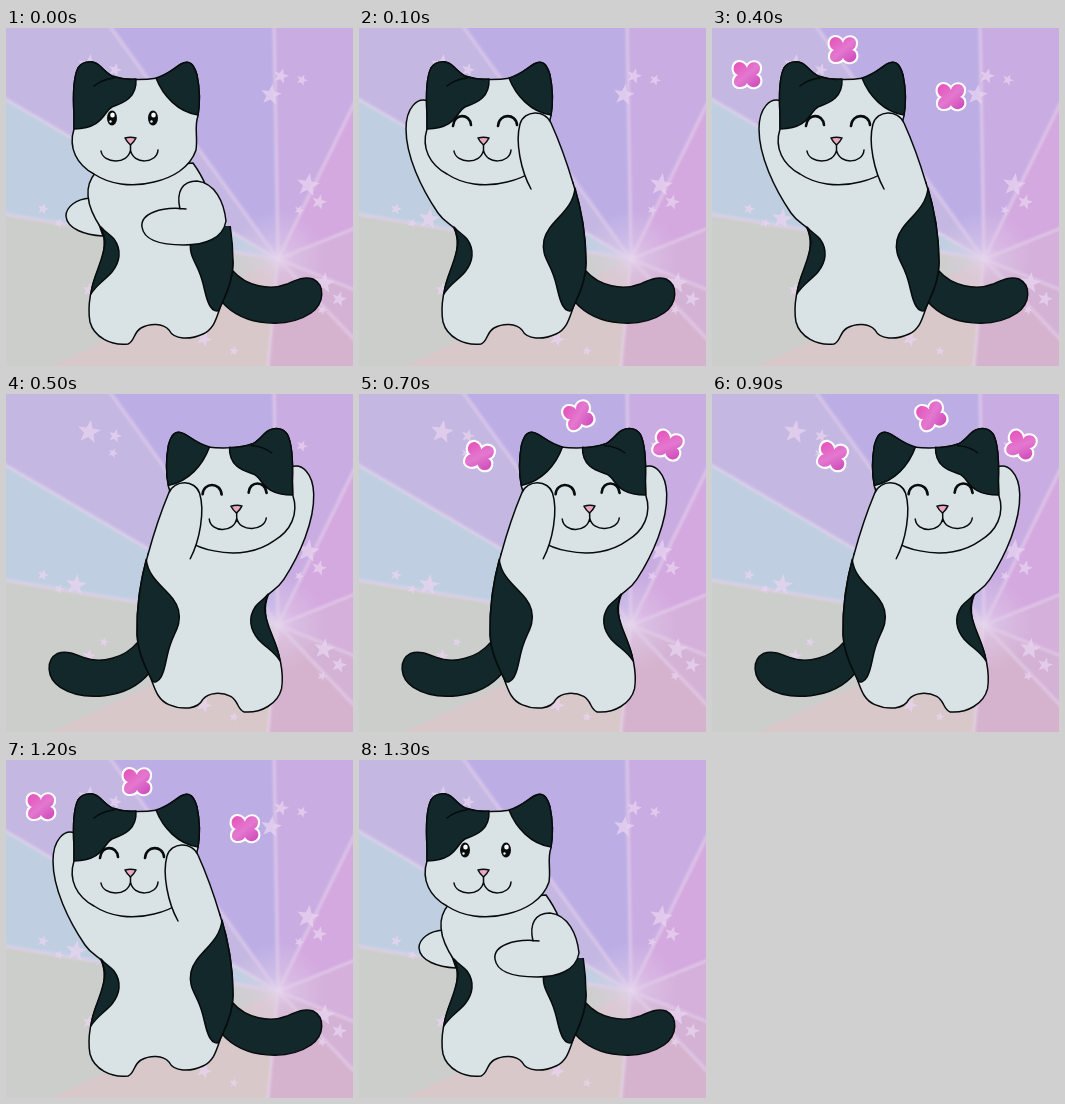
These frames come from a looping animation (347x338 px, 1.4 s). An HTML page:

```html
<!DOCTYPE html>
<html lang="en">
<head>
<meta charset="utf-8">
<title>Dancing cat</title>
<style>
html, body { margin: 0; width: 100%; height: 100%; overflow: hidden; background: #c8b6e2; }
svg { display: block; width: 100vw; height: 100vh; }
.line { fill: none; stroke: #070b0c; stroke-width: 1.5; stroke-linecap: round; stroke-linejoin: round; }
.fur { fill: #d9e3e6; }
.dark { fill: #12282b; }
.bold { stroke-width: 2.6; }
.ray { stroke: #e6d0ec; stroke-width: 3.5; opacity: .6; }
.star { fill: #e8d3f0; opacity: .75; }

/* 14 beats of 100 ms: rest, lean left, lean right, lean left, rest */
.rest, .left, .right, .flowers { animation: 1.4s step-end infinite; }
.rest { animation-name: rest; }
.left { animation-name: left; }
.right { animation-name: right; }
.flowers { animation-name: flowers; }
@keyframes rest {
  0%, 92.857%, 100% { visibility: visible }
  7.1428% { visibility: hidden }
}
@keyframes left {
  0%, 35.714%, 92.857%, 100% { visibility: hidden }
  7.1428%, 71.428% { visibility: visible }
}
@keyframes right {
  0%, 71.428%, 100% { visibility: hidden }
  35.714% { visibility: visible }
}
/* flowers pop up one beat after each change of pose */
@keyframes flowers {
  0%, 35.714%, 71.428%, 100% { visibility: hidden }
  14.2857%, 42.857%, 78.571% { visibility: inherit }
}
</style>
</head>
<body>
<svg viewBox="0 0 347 338" preserveAspectRatio="none">
  <defs>
    <radialGradient id="glow" gradientUnits="userSpaceOnUse" cx="272" cy="230" r="48">
      <stop offset="0" stop-color="#e6d6ee" stop-opacity=".8"/>
      <stop offset=".35" stop-color="#e0cdea" stop-opacity=".45"/>
      <stop offset="1" stop-color="#e0cdea" stop-opacity="0"/>
    </radialGradient>
    <linearGradient id="pink" gradientUnits="userSpaceOnUse" x1="-9" y1="-11" x2="9" y2="11">
      <stop offset="0" stop-color="#e558bd"/>
      <stop offset=".5" stop-color="#e378cf"/>
      <stop offset="1" stop-color="#d14fbd"/>
    </linearGradient>
    <filter id="soft" filterUnits="userSpaceOnUse" x="-20" y="-20" width="387" height="378"><feGaussianBlur stdDeviation="1.3"/></filter>
    <clipPath id="belowArm"><rect y="198" width="347" height="140"/></clipPath>

    <path id="petals" d="M0-7C2-15 13-14 13-7C13-3 11-1 9 0C15 1 15 11 8 12C4 13 1 10 0 8C-2 13-13 14-13 7C-13 3-11 1-9 0C-15-2-15-12-8-13C-4-13-1-10 0-7Z"/>
    <g id="flower">
      <use href="#petals" fill="#fff" stroke="#fff" stroke-width="4.2" stroke-linejoin="round"/>
      <use href="#petals" fill="url(#pink)"/>
    </g>

    <path id="tail" class="line dark" d="M227 243C240 258 264 263 281 256C290 252 298 248 307 251C319 257 319 275 305 285C283 300 239 300 216 274Z"/>

    <g id="patches" class="line">
      <path class="dark" d="M95 199C100 205 104 206 108 211C116 222 114 234 106 244C98 253 90 257 85 266C86 249 99 230 99 213C98 207 97 203 95 199Z"/>
      <path class="dark" d="M216 160C214 184 189 193 185 212C182 227 190 234 194 246C199 259 199 270 204 278C207 283 211 284 213 282C214 279 216 276 217 273C223 260 227 248 227 235C227 208 223 185 216 160Z"/>
    </g>

    <g id="head" class="line">
      <path class="fur" d="M68 87C67 70 67 50 72 40C77 32 88 32 95 39C99 43 102 46 106 48C122 53 138 52 152 50C163 46 168 40 175 36C184 31 188 37 191 47C194 62 194 76 192 88C188 98 192 108 190 122C184 140 166 150 148 154C125 160 103 156 88 146C71 137 62 120 68 101Z"/>
      <path class="dark" d="M68 87C67 70 67 50 72 40C77 32 88 32 95 39C99 43 102 46 106 48C114 51 122 52 130 51C131 71 116 75 106 79C97 84 98 100 68 101Z"/>
      <path class="dark" d="M150 50C163 46 168 40 175 36C184 31 188 37 191 47C194 62 194 76 192 87C172 84 157 68 150 50Z"/>
      <path d="M88 58C94 53 100 51 108 50"/>
      <path fill="#eba9c0" d="M119 110Q124.500 108.500 130 110Q128 114 124.500 117Q121 114 119 110Z"/>
      <path d="M124.500 117V123M95 123C97 136 122 137 124.500 122C127 137 151 136 152 122"/>
    </g>

    <g id="eye">
      <ellipse rx="5" ry="7.600" fill="#070b0c"/>
      <ellipse cx=".500" cy="-3" rx="2.300" ry="2.500" fill="#fff"/>
      <circle cx="-1.500" cy="3.500" r="1.200" fill="#e9eff0"/>
    </g>

    <g id="cheer">
      <use href="#tail"/>
      <path class="line fur" d="M69 73C58 69 47 80 47 101C47 128 62 160 79 185C86 195 92 196 95 200C101 213 98 227 93 240C85 257 81 278 84 294C88 309 105 318 122 316C129 313 127 305 135 300C144 295 157 295 163 302C168 312 184 312 197 306C210 300 211 286 216 275C223 261 227 249 227 235C227 206 222 178 214 155L180 100L80 100Z"/>
      <use href="#patches"/>
      <use href="#head"/>
      <path class="line bold" d="M94 98C95 85 111 85 112 97M139 98C140 85 157 85 158 97"/>
      <path class="line fur" d="M172 161C162 143 156 114 161 96C165 82 186 81 192 95C201 115 208 135 214 155"/>
    </g>
  </defs>

  <g id="sky"></g>
  <rect width="347" height="338" fill="url(#glow)"/>
  <g id="stars"></g>

  <g class="rest">
    <use href="#tail"/>
    <path class="line fur" d="M84 170C70 171 60 179 60 188C61 201 79 207 97 208Z"/>
    <path class="line fur" d="M90 144C75 161 83 182 95 200C101 213 98 227 93 240C85 257 81 278 84 294C88 309 105 318 122 316C129 313 127 305 135 300C144 295 157 295 163 302C168 312 184 312 197 306C210 300 211 286 216 275C223 261 227 249 227 235C226 222 223 210 216 200L200 158C196 148 192 142 187 135Z"/>
    <use href="#patches" clip-path="url(#belowArm)"/>
    <use href="#head"/>
    <use href="#eye" x="106" y="90"/>
    <use href="#eye" x="147" y="90"/>
    <path class="line fur" d="M174 181C170 164 176 153 191 153C209 155 218 174 220 193C217 211 198 217 178 217C160 217 138 214 136 199C134 186 155 178 180 181"/>
  </g>

  <g class="left">
    <use href="#cheer"/>
    <g class="flowers">
      <use href="#flower" transform="translate(35 47)"/>
      <use href="#flower" transform="translate(131 22)"/>
      <use href="#flower" transform="translate(239 69)"/>
    </g>
  </g>

  <g class="right">
    <use href="#cheer" transform="matrix(-1 .035 .025 1 352.2 -2.3)"/>
    <g class="flowers">
      <use href="#flower" transform="translate(120.500 62.500) rotate(14)"/>
      <use href="#flower" transform="translate(219.500 22) rotate(-20)"/>
      <use href="#flower" transform="translate(309 51.500) rotate(18)"/>
    </g>
  </g>
</svg>
<script>
const CX = 272, CY = 231;
const sky = document.getElementById('sky');
const stars = document.getElementById('stars');

function add(parent, tag, attrs) {
  const el = document.createElementNS('http://www.w3.org/2000/svg', tag);
  for (const k in attrs) el.setAttribute(k, attrs[k]);
  parent.append(el);
}

// ray ends around the edge, each with the colour of the sector that follows
const rays = [
  [-2, 70, '#c4b8e2'], [104, -2, '#bcaee5'], [268, -2, '#c9ade2'],
  [349, 74, '#d3a9df'], [349, 200, '#d4b0db'], [349, 262, '#d4b2d5'],
  [349, 312, '#d5b3cf'], [262, 340, '#d8c8c9'], [40, 340, '#cccecb'],
  [-2, 186, '#bfcfe1']
];
const corners = { 0: [-2, -2], 2: [349, -2], 6: [349, 340], 8: [-2, 340] };
rays.forEach(([x, y, fill], i) => {
  const [nx, ny] = rays[(i + 1) % rays.length];
  const pts = [CX, CY, x, y, ...(corners[i] || []), nx, ny];
  add(sky, 'polygon', { points: pts.join(' '), fill, stroke: fill });
});
rays.forEach(([x, y], i) => {
  if (i !== 8) add(sky, 'line', { x1: CX, y1: CY, x2: x, y2: y, class: 'ray', filter: 'url(#soft)' });
});

function star(x, y, r, turn) {
  const pts = Array.from({ length: 10 }, (_, i) => {
    const a = turn + i * Math.PI / 5, d = i % 2 ? r * .42 : r;
    return (x + d * Math.sin(a)).toFixed(1) + ',' + (y - d * Math.cos(a)).toFixed(1);
  });
  add(stars, 'polygon', { points: pts.join(' '), class: 'star' });
}
[
  [83, 38, 12], [109, 42, 7], [107, 59, 5], [265, 67, 11], [275, 48, 8], [296, 52, 6],
  [302, 157, 12], [313, 174, 8], [293, 182, 5], [70, 191, 11], [37, 181, 6], [53, 195, 5],
  [318, 255, 11], [333, 271, 8], [316, 282, 5], [83, 262, 7], [98, 248, 5],
  [198, 311, 8], [228, 323, 5]
].forEach(([x, y, r], i) => star(x, y, r, .15 + (i % 3) * .12));
</script>
</body>
</html>
```
